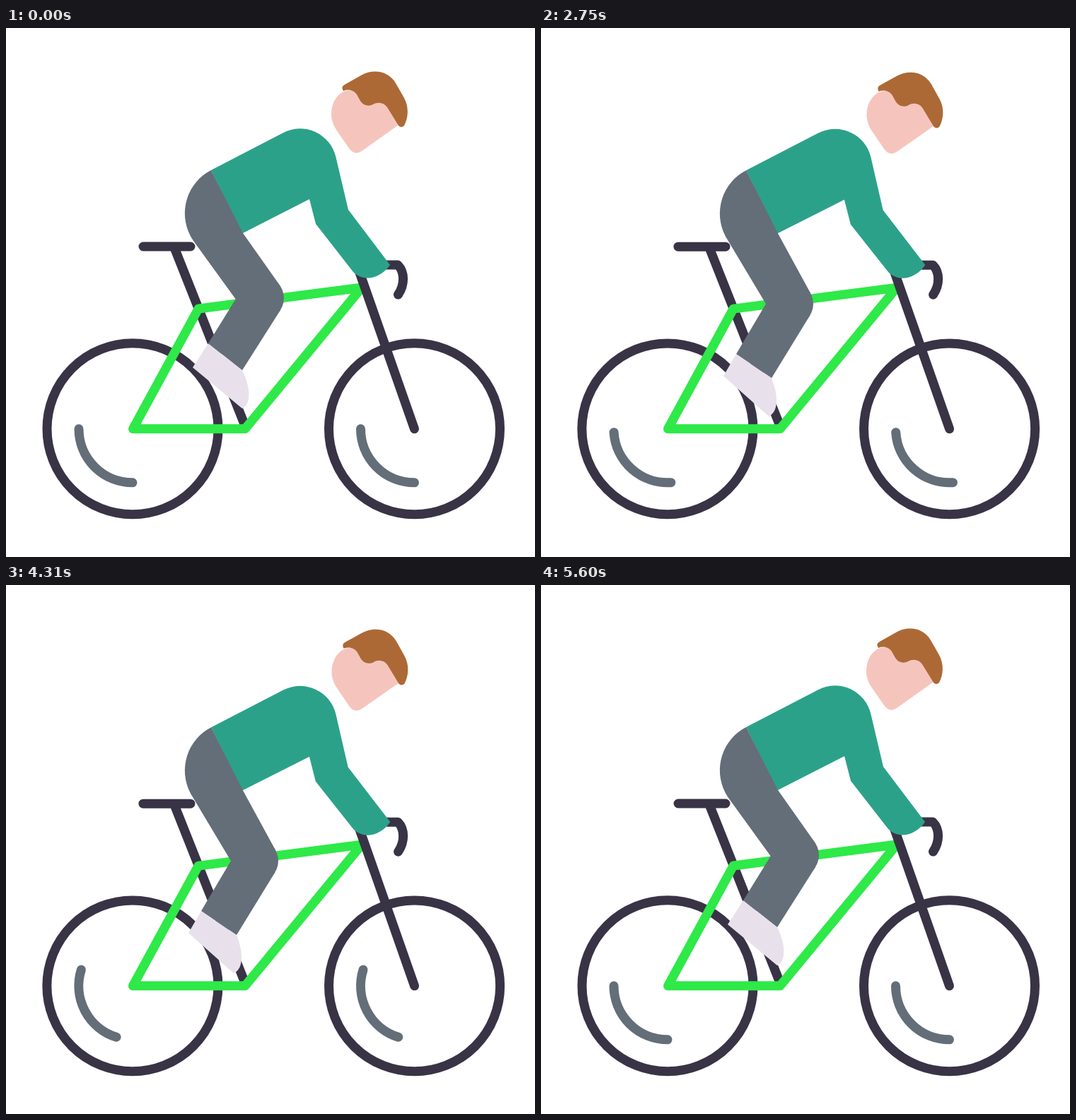
Recreate the animation shown at these times as an HTML page with a canvas. Size 748x748 px, loop 5630 ms.

```html
<!DOCTYPE html>
<html lang="en">
<head>
<meta charset="utf-8">
<title>Cyclist</title>
<style>
html, body { margin: 0; width: 100%; height: 100%; overflow: hidden; background: #fff; }
canvas { display: block; width: 748px; height: 748px; }
</style>
</head>
<body>
<canvas id="stage" width="748" height="748"></canvas>
<script>
const ctx = document.getElementById('stage').getContext('2d');
const LOOP = 5630, HOLD = 2000, STEP = 30, LAST = 120, SLOW = 91, CYCLE = 26;
const DARK = '#393346', GREY = '#646e78', GREEN = '#2ee948', TEAL = '#2ca18a';
const SHOE = '#e8e1ec', SKIN = '#f5c5bd', HAIR = '#ad6935';
const RAD = Math.PI / 180;

const mix = (a, b, k) => a + (b - a) * k;
const smooth = x => x * x * (3 - 2 * x);

// Pedal poses: phase, then knee, ankle back, ankle front, heel, toe
const poses = [
  [0, 362, 382, 286, 446, 334, 484, 264, 480, 334, 538],
  [1, 369, 380, 298, 452, 349, 484, 282, 487, 354, 538],
  [6, 377, 394, 349, 503, 401, 514, 351, 546, 428, 560],
  [13.45, 322, 436, 311, 563, 365, 593, 317, 618, 379, 650],
  [19.5, 326, 426, 241, 527, 298, 559, 223, 564, 290, 619],
  [25, 354, 390, 276, 461, 326, 495, 258, 492, 322, 549]
];

function poseAt(i) {
  const n = poses.length, turn = Math.floor(i / n), p = poses[i - turn * n].slice();
  p[0] += turn * CYCLE;
  return p;
}

// Smooth periodic curve through the poses
function legPose(phase) {
  phase %= CYCLE;
  let i = poses.length - 1;
  while (poses[i][0] > phase) i--;
  const [p, a, b, q] = [-1, 0, 1, 2].map(d => poseAt(i + d));
  const span = b[0] - a[0], u = (phase - a[0]) / span;
  const slope = (l, m, r, j) => {
    const h1 = m[0] - l[0], h2 = r[0] - m[0];
    return (h2 * (m[j] - l[j]) / h1 + h1 * (r[j] - m[j]) / h2) / (h1 + h2);
  };
  const value = j => {
    const s = smooth(u);
    return mix(a[j], b[j], s) + span * u * (1 - u) *
      ((1 - u) * slope(p, a, b, j) - u * slope(a, b, q, j));
  };
  return [1, 3, 5, 7, 9].map(j => [value(j), value(j + 1)]);
}

function bobAt(step) {
  const start = 0.5, half = CYCLE / 2, top = SLOW + start;
  if (step <= start) return 0;
  if (step > top) return 1 - smooth((step - top) / (LAST - top));
  const x = (step - start) / half, k = Math.floor(x), f = smooth(x - k);
  return k % 2 ? 1 - f : f;
}

function line(color, path) {
  ctx.strokeStyle = color;
  ctx.stroke(new Path2D(path));
}

function fill(color) {
  ctx.fillStyle = color;
  ctx.fill();
}

function polygon(color, points) {
  ctx.beginPath();
  points.forEach(p => ctx.lineTo(...p));
  ctx.closePath();
  fill(color);
}

function drawBike(bob, spin) {
  ctx.save();
  ctx.translate(378.5, 694);
  ctx.scale(1 + 0.0115 * bob, 1 - 0.01 * bob);
  ctx.translate(-378.5, -694);
  ctx.lineWidth = 13;
  ctx.lineCap = ctx.lineJoin = 'round';
  for (const x of [179, 577.5]) {
    ctx.beginPath();
    ctx.arc(x, 566.8, 121, 0, 2 * Math.PI);
    ctx.strokeStyle = DARK;
    ctx.stroke();
    ctx.beginPath();
    ctx.arc(x, 566.8, 76, (90 + spin) * RAD, (180 + spin) * RAD);
    ctx.strokeStyle = GREY;
    ctx.stroke();
  }
  line(DARK, 'M194 309H261M239 313L337 560');
  line(GREEN, 'M272 397L179.5 566.8H338L503 367Z');
  line(DARK, 'M498 340L577.5 566.8M530 335H554C564 345 564 363 554.5 377');
  ctx.restore();
}

function drawTorso(bob) {
  const at = (x0, y0, x1, y1) => [mix(x0, x1, bob), mix(y0, y1, bob)];
  const elbow = at(484, 257, 474, 268);
  ctx.beginPath();
  ctx.moveTo(...at(290, 201, 293, 205));
  ctx.arcTo(...at(451, 117.4, 465.4, 132.4), ...elbow, 52);
  ctx.lineTo(...elbow);
  ctx.lineTo(...at(543, 335, 550, 333));
  ctx.bezierCurveTo(...at(530, 354, 537, 360), ...at(506, 360, 512, 367), ...at(491, 345, 497, 352));
  ctx.lineTo(...at(438, 277, 433, 296));
  ctx.lineTo(...at(429, 242, 427, 259));
  ctx.lineTo(...at(334, 290.5, 331, 297.5));
  ctx.closePath();
  fill(TEAL);
}

function drawHead(bob) {
  ctx.save();
  ctx.translate(515 + 13.7 * bob, 118 + 30.3 * bob);
  ctx.rotate(10.5 * RAD * bob);
  ctx.translate(-515, -118);
  ctx.fillStyle = SKIN;
  ctx.fill(new Path2D('M484 88C470 90 460 104 460 122C460 130 463 138 467 144L485 170Q493 181 503 174L555 137L540 105L515 90Z'));
  ctx.fillStyle = HAIR;
  ctx.fill(new Path2D('M477 89Q473 83 479 80L502 67C520 57 541 61 551 78L563 99C570 112 569 127 563 138Q559 142 555 138L539 112C534 105 526 104 519 108C511 112 504 108 501 103L496 94C492 88 484 86 477 89Z'));
  ctx.restore();
}

function drawLeg(bob, phase) {
  const [knee, back, front, heel, toe] = legPose(phase);
  const at = (x0, y0, x1, y1) => [mix(x0, x1, bob), mix(y0, y1, bob)];
  const waistTop = at(290, 201, 293, 205), waistLow = at(335, 290, 332, 297);
  const hip = at(321.5, 262, 330, 272), thigh = at(302, 296, 300, 301);
  const normal = (p, q) => {
    const dx = q[0] - p[0], dy = q[1] - p[1], len = Math.hypot(dx, dy);
    return [dy / len, -dx / len];
  };
  const off = (p, n, d) => [p[0] + n[0] * d, p[1] + n[1] * d];
  const n = normal(thigh, knee);
  const ankle = [(back[0] + front[0]) / 2, (back[1] + front[1]) / 2];
  const m = normal(knee, ankle);
  const rx = waistTop[0] - hip[0], ry = waistTop[1] - hip[1];

  ctx.beginPath();
  ctx.arc(...hip, Math.hypot(rx, ry), Math.atan2(ry, rx), Math.atan2(-n[1], -n[0]), true);
  ctx.lineTo(...off(knee, n, -31));
  ctx.lineTo(...off(knee, n, 31));
  ctx.lineTo(...waistLow);
  ctx.closePath();
  fill(GREY);
  ctx.beginPath();
  ctx.arc(...knee, 31, 0, 2 * Math.PI);
  fill(GREY);
  polygon(GREY, [off(knee, m, -31), off(knee, m, 31), front, back]);

  const ex = toe[0] - front[0], ey = toe[1] - front[1];
  const bulge = (along, out) => [front[0] + along * ex + out * ey, front[1] + along * ey - out * ex];
  ctx.beginPath();
  ctx.moveTo(...back);
  ctx.lineTo(...front);
  ctx.bezierCurveTo(...bulge(0.35, 0.18), ...bulge(0.85, 0.28), ...toe);
  ctx.lineTo(...heel);
  ctx.closePath();
  fill(SHOE);
}

function draw(time) {
  const step = Math.max(0, Math.min(LAST, Math.floor((time % LOOP - HOLD) / STEP + 1e-6)));
  const late = Math.max(0, step - SLOW) / (LAST - SLOW);
  const early = Math.min(step, SLOW);
  const spin = early / SLOW * 1297 + late * 143;
  const phase = early + late * CYCLE / 2;
  const bob = bobAt(step);
  ctx.fillStyle = '#fff';
  ctx.fillRect(0, 0, 748, 748);
  drawBike(bob, spin);
  drawTorso(bob);
  drawLeg(bob, phase);
  drawHead(bob);
}

const began = performance.now();
function tick() {
  draw(performance.now() - began);
  requestAnimationFrame(tick);
}
tick();
</script>
</body>
</html>
```
